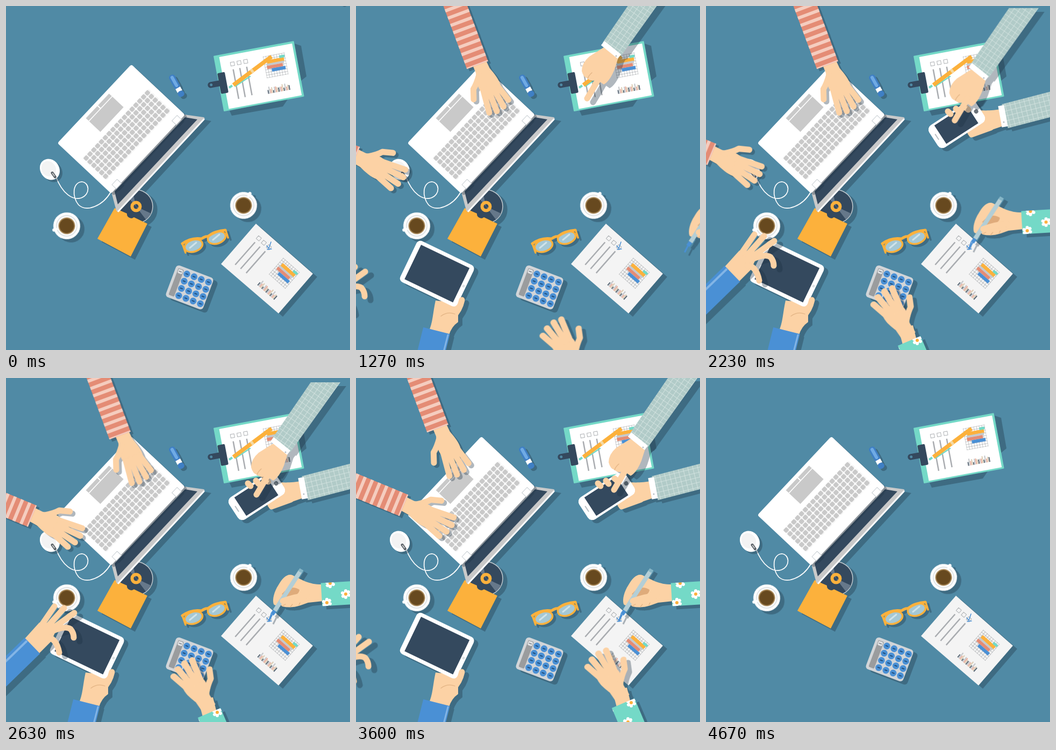
An HTML page without scripts for the animation above (4810 ms loop, 640 px wide and 640 px high).

```html
<!DOCTYPE html>
<html lang="en">
<head>
<meta charset="utf-8">
<title>Team at a desk</title>
<style>
html, body { margin: 0; height: 100%; overflow: hidden; background: #508aa5; }
svg { display: block; width: 100vw; height: 100vh; fill: none; stroke-linecap: round; stroke-linejoin: round; --shade: rgba(30, 50, 65, .35); }
.low { filter: drop-shadow(5px 4px 0 var(--shade)); }
.mid { filter: drop-shadow(8px 6px 0 var(--shade)); }
.high { filter: drop-shadow(11px 7px 0 var(--shade)); }
.cast { fill: var(--shade); }
.white { fill: #fff; }
.navy { fill: #34495e; }
.grey { fill: #c9c9c9; }
.skin { fill: #fcd2a5; }
.finger { stroke: #fcd2a5; stroke-width: 11; }
.crease { stroke: #e3b485; stroke-width: 1.3; }
.sleeve, .pen { stroke-linecap: butt; }
.salmon { stroke: #e48c75; }
.stripe { stroke: #f5cdbf; stroke-dasharray: 6 8.5; stroke-dashoffset: -11; }
.orange { fill: #fcb13c; }
.blue { fill: #4a90d5; }
.mover { animation: 4.81s ease-in-out infinite; }
.typist-r { animation-name: typist-r; }
.typist-l { animation-name: typist-l; }
.pointer { animation-name: pointer; }
.phone { animation-name: phone; }
.tapper { animation-name: tapper; }
.tablet { animation-name: tablet; }
.counter { animation-name: counter; }
.writer { animation-name: writer; }
@keyframes typist-r {
  0%, 5.3% { transform: translate(-54px, -214px); }
  24.5%, 46.6% { transform: none; }
  73.6%, 75.7% { transform: translate(-74px, -16px); }
  95.6%, 100% { transform: translate(-134px, -225px); }
}
@keyframes typist-l {
  0%, 6.1% { transform: translate(-106px, -20px); }
  24.5%, 38.9% { transform: none; }
  68.6%, 75.7% { transform: translate(90px, -45px); }
  94.8%, 100% { transform: translate(-112px, -70px); }
}
@keyframes pointer {
  0%, 1.5% { transform: translate(153px, -228px); }
  20.8%, 33.3% { transform: translate(-36px, -45px); }
  49.9%, 56.8% { transform: none; }
  66.5%, 77% { transform: translate(14px, -9px); }
  96%, 100% { transform: translate(160px, -235px); }
}
@keyframes phone {
  0%, 27% { transform: translate(234px, 10px); }
  44.7%, 77% { transform: none; }
  96%, 100% { transform: translate(234px, 10px); }
}
@keyframes tapper {
  0%, 15.4% { transform: translate(-148px, 77px); }
  46.8%, 57.2% { transform: none; }
  86.1%, 100% { transform: translate(-150px, 78px); }
}
@keyframes tablet {
  0%, 7.5% { transform: translate(-14px, 210px); }
  25%, 79% { transform: none; }
  96.9%, 100% { transform: translate(-14px, 210px); }
}
@keyframes counter {
  0%, 18.3% { transform: translate(75px, 122px); }
  34.1%, 56.8% { transform: none; }
  72.8%, 77% { transform: translate(119px, -18px); }
  96%, 100% { transform: translate(170px, 125px); }
}
@keyframes writer {
  0%, 16.3% { transform: translate(156px, 8px); }
  47.8%, 77% { transform: none; }
  96.9%, 100% { transform: translate(160px, 8px); }
}
</style>
</head>
<body>
<svg viewBox="0 0 640 640">
<defs>
  <pattern id="keys" x="11" y="53" width="10.4" height="9.9" patternUnits="userSpaceOnUse">
    <rect width="8.8" height="8.3" rx="2" class="grey"/>
  </pattern>
  <pattern id="grid" x="80" y="14" width="5" height="5" patternUnits="userSpaceOnUse">
    <path d="M0 0H5M0 0V5" stroke="#8d9196"/>
  </pattern>
  <pattern id="check" width="9" height="9" patternUnits="userSpaceOnUse" patternTransform="rotate(35)">
    <rect width="9" height="9" fill="#b1cbc8"/>
    <path d="M0 0H9M0 0V9" stroke="#d9e7e4" stroke-width="1.6"/>
  </pattern>
  <pattern id="check-flat" href="#check" patternTransform="rotate(-14)"/>
  <g id="flower">
    <path d="M0-6V6M-6-2L6 2M-5 4L5-4" stroke="#fff" stroke-width="6"/>
    <circle r="3" class="orange"/>
  </g>
  <pattern id="floral" x="582" y="370" width="70" height="60" patternUnits="userSpaceOnUse">
    <rect width="70" height="60" fill="#74d9c7"/>
    <use href="#flower" x="21" y="12"/>
    <use href="#flower" x="50" y="32"/>
    <use href="#flower" x="15" y="48"/>
  </pattern>
  <g id="cup">
    <circle r="25" class="white"/>
    <path d="M18 0H25" stroke="#fff" stroke-width="6"/>
    <circle r="19" stroke="#dfe3e5" stroke-width="2"/>
    <path d="M16 0H25" stroke="#fff" stroke-width="4"/>
    <circle r="15.5" fill="#a48352"/>
    <circle r="13.5" fill="#67491f"/>
  </g>
  <g id="report">
    <path d="M18.5 13.5h7v7h-7zM31 13.5h7v7h-7zM43.5 13.5h7v7h-7z" stroke="#aeb1b4"/>
    <path d="M21.5 27V83M34 27V82M47 27V81" stroke="#a9acb0" stroke-width="2.5" stroke-linecap="butt"/>
    <rect x="80" y="14" width="41" height="41" fill="url(#grid)"/>
    <g stroke-linecap="butt">
      <path d="M86 25.500H118" stroke="#fcb13c" stroke-width="7"/>
      <path d="M110 20H120" stroke="#74d9c7" stroke-width="5"/>
      <path d="M84 30.500H117" stroke="#c5c9cc" stroke-width="4"/>
      <path d="M84 35.500H114" stroke="#e48c75" stroke-width="6"/>
      <path d="M92 41.500H118" stroke="#4a90d5" stroke-width="6"/>
      <g stroke-width="2">
        <path d="M78 84V77M88 84V79M98 84V76M108 84V78M118 84V75" stroke="#5a6876"/>
        <path d="M80.500 84V71M90.500 84V73M100.500 84V75M110.500 84V71" stroke="#c4c7ca"/>
        <path d="M83 84V76M93 84V73M103 84V75M113 84V77" stroke="#ecae9c"/>
        <path d="M85.500 84V73M95.500 84V75M105.500 84V71M115.500 84V74" stroke="#dccdb3"/>
      </g>
    </g>
  </g>
  <g id="hand">
    <path class="skin" d="M-12-13L12-14C25-18 38-22 50-20L55 17L38 19C28 19 20 16 10 13L-12 13Z"/>
    <path class="finger" d="M16 9Q30 20 36 29L54 36M46 13L88 19M46 4L91 5M46-5L88-10M46-14L80-23"/>
  </g>
  <g id="button">
    <circle r="6.300" class="blue"/>
    <path d="M-2 0H2" stroke="#24507c" stroke-width="2"/>
  </g>
  <g id="buttons">
    <use href="#button"/><use href="#button" x="14.300"/><use href="#button" x="28.600"/><use href="#button" x="42.900"/>
  </g>
</defs>

<rect width="640" height="640" fill="#508aa5"/>
<path class="cast" d="M340 206L382 214L223 386L208 383Z"/>

<!-- disc and its envelope -->
<g class="mid">
  <circle cx="242" cy="373" r="31" class="navy" stroke="#c3cbd0" stroke-width="1.500"/>
  <path d="M242 373L270 386A31 31 0 0 1 260 397Z" fill="#66788a"/>
  <path d="M242 373L222 350A31 31 0 0 1 235 343Z" fill="#66788a"/>
  <path class="orange" d="M202 376L225 386A8 8 0 0 0 238 393L263 405L232 466L170 433Z"/>
</g>
<circle cx="242" cy="373" r="7.500" stroke="#fcb13c" stroke-width="6"/>

<!-- laptop -->
<path class="grey" d="M332 202L368 207Q371 209 368 212L211 381Q207 385 205 380L196 346Z"/>
<path d="M368 211L209 382" stroke="#fff" stroke-width="3"/>
<path class="navy" d="M333 207L356 211L208 369L202 345Z"/>
<g class="low"><g transform="translate(97 255) rotate(-46.800)">
  <rect x="-1" y="-1" width="201" height="137" rx="4" class="white"/>
  <path class="grey" d="M69 6H100V13H69ZM102 6H132V13H102ZM69 14.500H132V43H69Z"/>
  <rect x="11" y="53" width="177" height="59.400" fill="url(#keys)"/>
  <path d="M12 126h14v11h-14zM175 126h14v11h-14z" class="white" stroke="#c5ccd0"/>
</g></g>

<!-- mouse -->
<path d="M93 318C105 350 125 362 140 357C158 350 155 328 141 327C124 328 122 355 135 370C150 384 180 372 195 346" stroke="#fff" stroke-width="1.700"/>
<g class="low"><g transform="translate(81.500 304) rotate(-35)">
  <ellipse rx="17.500" ry="20.500" class="white"/>
  <ellipse cx="-1" cy="-2" rx="13" ry="15" fill="#f3f3f3"/>
  <path d="M0 8V17" stroke="#555c62" stroke-width="5"/>
  <path d="M0 9V15" stroke="#c9c9c9" stroke-width="2"/>
</g></g>

<!-- memory stick -->
<g class="low"><g transform="translate(309 133) rotate(61)">
  <rect x="-5" y="-6" width="29" height="12" rx="5" fill="#3f7fc4"/>
  <rect x="22" y="-5" width="8" height="10" class="white"/>
  <rect x="29" y="-6" width="11" height="12" rx="5" fill="#3f7fc4"/>
  <path d="M0 0H17" stroke="#6faae4" stroke-width="6"/>
</g></g>

<g class="mid">
  <use href="#cup" transform="translate(113 409) rotate(162)"/>
  <use href="#cup" transform="translate(442 371) rotate(-62)"/>
</g>

<!-- clipboard -->
<path class="cast" d="M537 70L549 74L559 131L548 140ZM416 195L420 204L515 187L526 171Z"/>
<g transform="translate(386 93) rotate(-10.600)">
  <rect width="152" height="105" rx="1" fill="#74d9c7"/>
  <rect x="10" y="4" width="138" height="98" class="white"/>
  <use href="#report" x="10" y="4"/>
  <path d="M-15 52H3" stroke="#34495e" stroke-width="11"/>
  <rect x="1" y="33" width="14" height="39" rx="2" class="navy"/>
  <circle cx="-14" cy="52" r="2.500" fill="#508aa5"/>
</g>
<path d="M427 149L454 131" stroke="#74d9c7" stroke-width="2.500"/>
<g class="pen">
  <path d="M423 147L494 94" stroke="#fcb13c" stroke-width="7.500"/>
  <path d="M456 122.500L460 119.500" stroke="#f6d9a0" stroke-width="8"/>
  <path d="M415 152L421 148" stroke="#74d9c7" stroke-width="4"/>
</g>

<!-- loose report -->
<path class="mid" d="M465 405L571 498L507 572L400 480Z" fill="#f4f4f4"/>
<use href="#report" transform="translate(465 405) rotate(41.300)"/>
<path d="M485 446L489 451L493 439M486 453L494 452" stroke="#4a90d5" stroke-width="1.500"/>

<!-- glasses -->
<g class="low" stroke="#fcb13c" stroke-width="3.500">
  <path d="M328 442L334 459M409 418L413 431"/>
  <ellipse cx="349" cy="446" rx="17" ry="11" transform="rotate(-18 349 446)" fill="#a5c8d5"/>
  <ellipse cx="392" cy="431" rx="17" ry="11" transform="rotate(-18 392 431)" fill="#a5c8d5"/>
  <path d="M328 442Q345 430 364 433Q371 428 375 429Q390 418 408 417" stroke-width="5"/>
</g>
<path d="M342 450L354 440M385 435L397 425" stroke="#cfe3ea" stroke-width="3"/>

<!-- calculator -->
<g class="mid"><g transform="translate(318 481) rotate(20.600)">
  <rect width="74" height="63" rx="6" fill="#d2d5d8"/>
  <rect x="5" y="5" width="11" height="53" rx="2" fill="#9a9c9e"/>
  <rect x="6" y="6" width="9" height="8" rx="2" fill="#dfe2e4"/>
  <path d="M8 10H13" stroke="#55606a"/>
  <use href="#buttons" x="23.500" y="10"/><use href="#buttons" x="23.500" y="24.300"/>
  <use href="#buttons" x="23.500" y="38.600"/><use href="#buttons" x="23.500" y="52.900"/>
</g></g>

<!-- people -->
<g class="mover tablet"><g class="mid">
  <path class="skin" d="M135 606C143 590 143 570 148 548L190 552L190 588Q178 596 173 612Z"/>
  <path class="sleeve" d="M150 604L136 660" stroke="#4a90d5" stroke-width="51"/>
  <path d="M171 612L160 655" stroke="#83b5e6" stroke-width="3"/>
  <g transform="translate(116 434) rotate(25.700)">
    <rect width="118" height="85" rx="8" class="white"/>
    <rect x="9" y="7" width="100" height="71" class="navy"/>
    <circle cx="113.500" cy="42" r="2.500" fill="#e0e3e5"/>
  </g>
  <path d="M180 578Q193 566 197 547" class="finger" stroke-width="13"/>
  <path d="M158 577Q170 568 184 573" class="crease"/>
</g></g>

<g class="mover tapper"><g class="high">
  <path class="skin" d="M34 486L62 455L86 456L92 472L84 490L58 516Z"/>
  <path class="finger" d="M66 460L90 425M77 463L108 428M84 468L127 437M84 472Q110 460 120 467Q126 474 126 483M76 482Q94 484 99 511"/>
  <path class="sleeve" d="M49 498L-25 570" stroke="#4a90d5" stroke-width="41"/>
  <path d="M39 489L-25 551" class="sleeve" stroke="#83b5e6" stroke-width="4"/>
</g></g>

<g class="mover counter"><g class="mid">
  <use href="#hand" transform="translate(372 605) rotate(-122) scale(.93 1.080)"/>
  <path class="skin" d="M358 600L385 594L392 622L366 630Z"/>
  <path class="sleeve" d="M378 623L440 769" stroke="url(#floral)" stroke-width="46"/>
</g></g>

<g class="mover writer"><g class="mid">
  <path class="skin" d="M590 384C565 385 552 376 535 368C525 362 515 371 507 385C499 397 495 412 498 421Q503 426 508 419L514 425Q530 429 548 423L562 418L590 415Z"/>
  <path d="M513 402Q530 383 546 394Q545 405 525 409Z" fill="#dfab7b"/>
  <g class="pen">
    <path d="M548 359L500 433" stroke="#b3ced6" stroke-width="8"/>
    <path d="M550 356L547 361" stroke="#86b6c7" stroke-width="8"/>
    <path d="M500 433L495 440" stroke="#4a90d5" stroke-width="7"/>
    <path d="M495 440L489 452" stroke="#4a90d5" stroke-width="3"/>
  </g>
  <path class="finger" d="M560 405Q540 406 515 415"/>
  <path class="crease" d="M514 424L520 421M529 426L533 421M545 422L547 418"/>
  <path class="sleeve" d="M587 403L670 398" stroke="url(#floral)" stroke-width="43"/>
</g></g>

<g class="mover phone"><g class="mid">
  <path class="skin" d="M552 191C530 196 515 194 500 194L470 200L488 240L530 231L556 222Z"/>
  <path class="finger" d="M530 226L494 239"/>
  <g transform="translate(410 227) rotate(-33)">
    <rect width="103" height="49" rx="10" class="white"/>
    <rect x="15" y="4" width="71" height="41" class="navy"/>
    <path d="M7.500 19V30" stroke="#b9bfc4" stroke-width="2"/>
    <circle cx="94.500" cy="24.500" r="4" fill="#6a7279"/>
  </g>
  <path class="finger" d="M450 196L455 201M465 191L470 197M481 187L488 193"/>
  <path class="sleeve" d="M556 205L660 178" stroke="url(#check-flat)" stroke-width="46"/>
  <path class="sleeve" d="M547 206L558 204" stroke="#fff" stroke-width="40"/>
  <circle cx="554" cy="216" r="1.500" fill="#b9bfc4"/>
</g></g>

<g class="mover pointer"><g class="high">
  <path class="skin" d="M497 122L470 139Q456 151 456 166Q459 178 467 180Q474 187 484 182L497 191Q508 185 517 163L524 141Z"/>
  <path d="M490 176Q478 197 466 217" class="finger"/>
  <path d="M467 180Q469 174 475 169" class="crease"/>
  <path d="M567 8H622L529 138L495 113Z" fill="url(#check)"/>
  <path class="sleeve" d="M495 114L526 139" stroke="#fff" stroke-width="10"/>
  <circle cx="520" cy="138" r="1.500" fill="#b9bfc4"/>
</g></g>

<g class="mover typist-l"><g class="low">
  <use href="#hand" transform="translate(3 281) rotate(27) scale(1.020 -1.020)"/>
  <path class="sleeve salmon" d="M-1 282L-139 225" stroke-width="43"/>
  <path class="sleeve stripe" d="M-1 282L-139 225" stroke-width="43"/>
</g></g>

<g class="mover typist-r"><g class="low">
  <use href="#hand" transform="translate(231 110) rotate(67)"/>
  <path class="sleeve salmon" d="M226 110L170 -40" stroke-width="42"/>
  <path class="sleeve stripe" d="M226 110L170 -40" stroke-width="42"/>
</g></g>
</svg>
</body>
</html>
```
